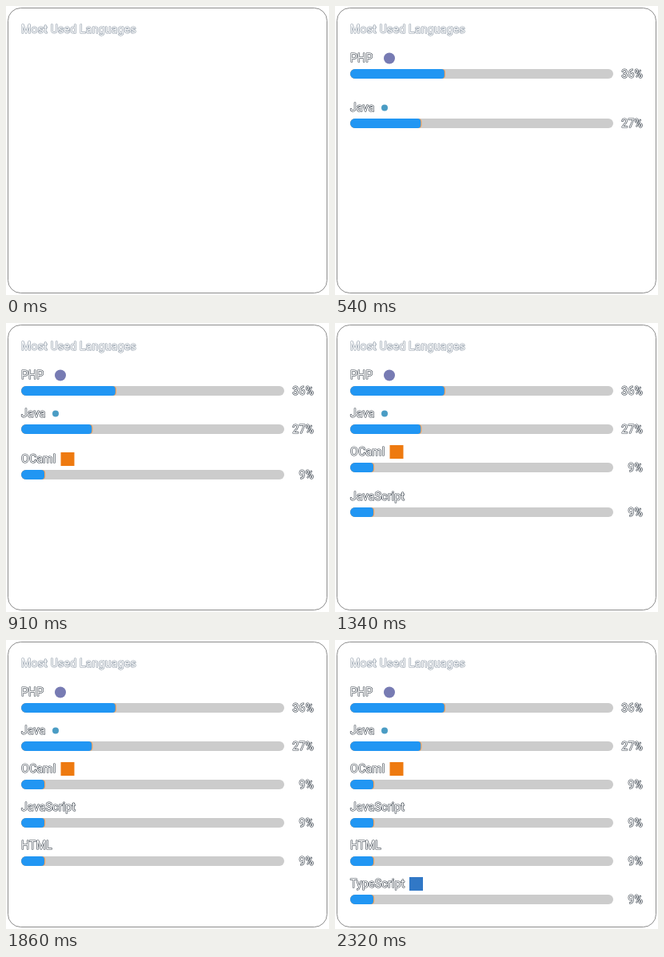
Animation, 404 px wide and 362 px high, one loop 2340 ms. Source, as an HTML page with a canvas:

```html
<!DOCTYPE html>
<html lang="en">
<head>
<meta charset="utf-8">
<title>Most Used Languages</title>
<style>
  html, body { margin: 0; width: 100%; height: 100%; overflow: hidden; background: #fff; }
  canvas { display: block; }
</style>
</head>
<body>
<canvas id="stage" width="404" height="362"></canvas>
<script>
const ctx = document.getElementById('stage').getContext('2d');
const LOOP = 2340;
const ROW_PITCH = 48;
const BAR = { x: 19, y: 79, width: 329, height: 12 };

// Moments (ms) at which the motion advances by one step.
const ticks = [
  0, 20, 120, 140, 160, 260, 280, 300, 400, 440, 540,
  560, 610, 630, 730, 750, 770, 870, 890, 910, 1010, 1030, 1050,
  1150, 1170, 1190, 1290, 1310, 1340, 1360, 1440, 1460, 1480, 1580, 1600, 1620,
  1720, 1740, 1760, 1860, 1880, 1900, 2000, 2020, 2040, 2140, 2160, 2180,
  2280, 2300, 2320
];

// Each row enters at step `start`, `rise` px low, and settles over `steps`.
const rows = [
  { name: 'PHP', percent: 36, start: 1, rise: 24, steps: 8, badge: { shape: 'circle', x: 68, size: 14, color: '#777bb3' } },
  { name: 'Java', percent: 27, start: 9, rise: 21, steps: 8, badge: { shape: 'circle', x: 62, size: 8, color: '#4a9cc4' } },
  { name: 'OCaml', percent: 9, start: 17, rise: 21, steps: 8, badge: { shape: 'square', x: 77, size: 17, color: '#ee7a10' } },
  { name: 'JavaScript', percent: 9, start: 25, rise: 31, steps: 8 },
  { name: 'HTML', percent: 9, start: 33, rise: 24, steps: 6 },
  { name: 'TypeScript', percent: 9, start: 40, rise: 29, steps: 11, badge: { shape: 'square', x: 101.5, size: 17, color: '#3178c6' } }
];

function roundedBox(x, y, width, height, radii, color) {
  ctx.beginPath();
  ctx.roundRect(x, y, width, height, radii);
  ctx.fillStyle = color;
  ctx.fill();
}

function outlinedText(text, x, y, outline, align = 'left') {
  ctx.textAlign = align;
  ctx.strokeStyle = outline;
  ctx.lineWidth = 1.2;
  ctx.strokeText(text, x, y);
  ctx.fillStyle = '#fff';
  ctx.fillText(text, x, y);
}

function drawBadge({ shape, x, size, color }) {
  const radius = shape === 'circle' ? size / 2 : 0;
  roundedBox(x - size / 2, 65.5 - size / 2, size, size, radius, color);
}

function drawBar(percent) {
  const { x, y, width, height } = BAR;
  const filled = width * percent / 100;
  roundedBox(x, y, width, height, 6, '#ccc');
  roundedBox(x, y, filled + 0.6, height, [6, 4, 4, 6], '#f5a45c');
  roundedBox(x, y, filled - 0.6, height, [6, 4, 4, 6], '#2196f3');
}

function drawRow(row, index, step) {
  const age = step - row.start;
  if (age < 0) return;
  const remaining = Math.max(0, 1 - age / row.steps);
  ctx.save();
  ctx.translate(0, index * ROW_PITCH + Math.round(row.rise * remaining ** 3));
  outlinedText(row.name, 19, 70, '#39424c');
  if (row.badge) drawBadge(row.badge);
  drawBar(row.percent);
  outlinedText(row.percent + '%', 385, 90, '#39424c', 'right');
  ctx.restore();
}

function drawCard() {
  ctx.fillStyle = '#fff';
  ctx.fillRect(0, 0, 404, 362);
  ctx.beginPath();
  ctx.roundRect(2.5, 2.5, 399, 357, 16);
  ctx.strokeStyle = '#8c8c8c';
  ctx.lineWidth = 1;
  ctx.stroke();
  outlinedText('Most Used Languages', 19, 34, '#8592a0');
}

function draw(time) {
  const step = ticks.findLastIndex(tick => tick <= time);
  ctx.font = '14px Roboto, sans-serif';
  ctx.letterSpacing = '0.25px';
  ctx.lineJoin = 'round';
  drawCard();
  rows.forEach((row, index) => drawRow(row, index, step));
}

const begin = performance.now();
function frame() {
  draw((performance.now() - begin) % LOOP);
  requestAnimationFrame(frame);
}
frame();
</script>
</body>
</html>
```
